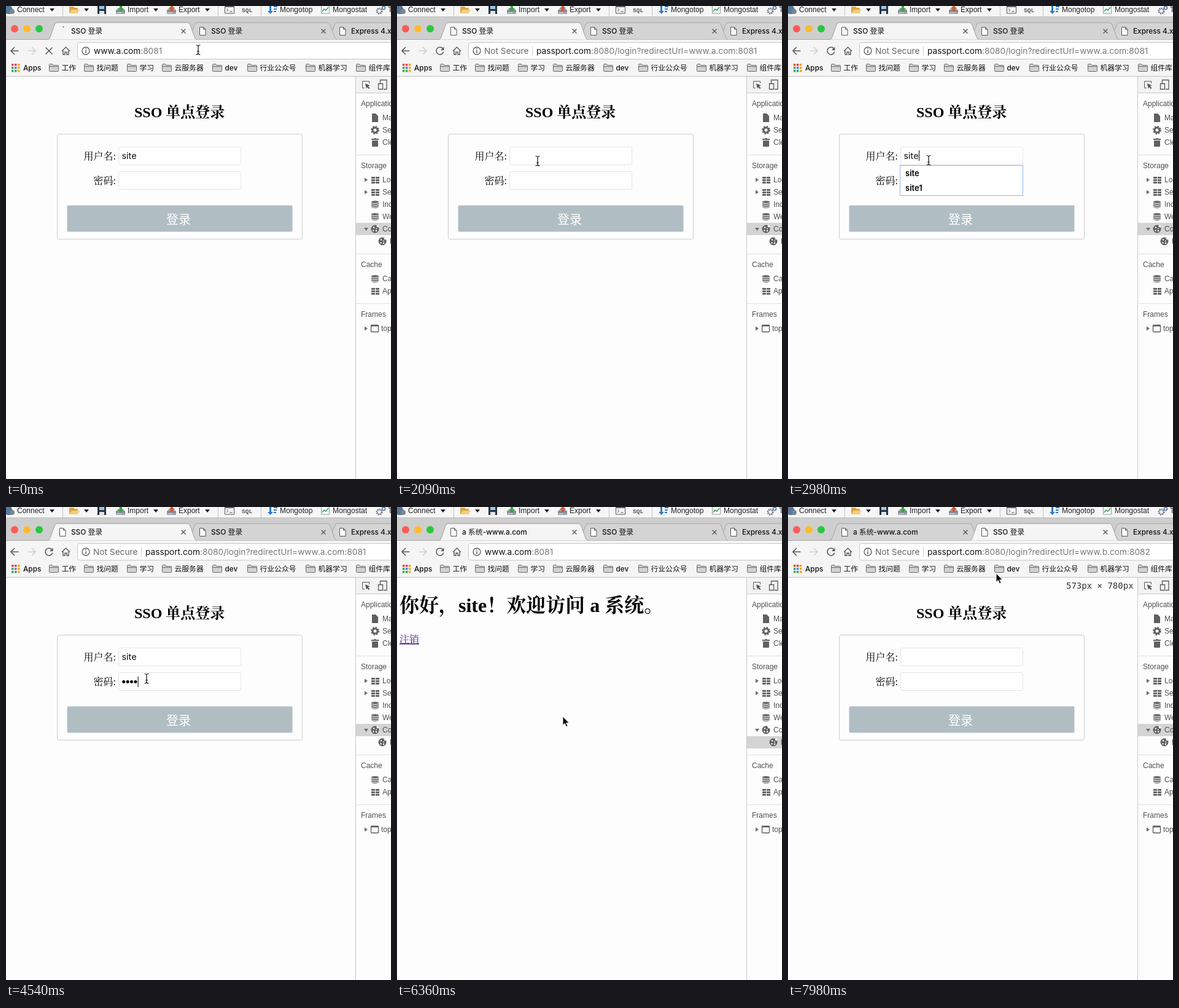
An HTML page for the animation above (8 s loop, 627x770 px).

```html
<!DOCTYPE html>
<html lang="zh-CN">
<head>
<meta charset="utf-8">
<title>SSO</title>
<style>
html, body { margin: 0; width: 100%; height: 100%; overflow: hidden; background: #fdfdfd }
svg { display: block; width: 627px; height: 770px }
text { font: 12px Inter, "Noto Sans CJK SC", sans-serif; fill: #111; white-space: pre }
.tool { font: 12px "Liberation Sans", Arial, sans-serif; fill: #222 }
.dev { font: 12px "Liberation Sans", Arial, sans-serif; fill: #505050 }
.mark { font-weight: 500; font-size: 11.8px }
.url { font-size: 13.7px }
.dim { fill: #777 }
.serif { font: 16px "Liberation Serif", "Noto Serif CJK SC", "Noto Sans CJK SC", serif; fill: #000 }
.field { font-size: 14.4px }
.item { font-size: 13px; font-weight: 600; fill: #000 }
.line { fill: none; stroke: #5a5a5a; stroke-width: 1.6 }
.thin { fill: none; stroke: #5a5a5a }
</style>
</head>
<body>
<svg viewBox="0 0 627 770">
<defs>
  <path id="tab" d="M0 54.5q3 -.5 4 -4l7 -19.5q1.500 -4 4 -4H228q2.500 0 4 4l7 19.500q1 3.500 4 4" stroke="#a6a6a6"/>
  <path id="sheet" d="M.5 .5h6l3.500 3.500v9.500h-9.500zM6.500 .5v3.500h3.500" fill="#fff" stroke="#555"/>
  <path id="cross" d="M-3.500 -3.500l7 7m0 -7l-7 7" stroke="#555" stroke-width="1.3"/>
  <path id="folder" d="M.5 11.500v-10q0 -1 1 -1h4l1.500 2h7.500q1 0 1 1v8q0 1 -1 1h-13q-1 0 -1 -1zM.5 4.500h15" fill="#d2d2d2" stroke="#6b6b6b"/>
  <path id="drop" d="M-4 -2h8l-4 5z" fill="#222"/>
  <path id="open" d="M0 -3.500l5 3.500l-5 3.500z" fill="#6e6e6e"/>
  <path id="grid" d="M0 0h6v3h-6zM7 0h6v3h-6zM0 4h6v3h-6zM7 4h6v3h-6zM0 8h6v3h-6zM7 8h6v3h-6z" fill="#666"/>
  <g id="base" fill="#6b6b6b"><path d="M0 2v8.500q6 3.500 12 0v-8.500z"/><ellipse cx="6" cy="2" rx="6" ry="2"/>
    <path d="M0 3.500q6 2.500 12 0M0 6.500q6 2.500 12 0M0 9.500q6 2.500 12 0" fill="none" stroke="#fdfdfd"/></g>
  <g id="cookie"><circle r="6.500" fill="#606060"/><g fill="#f4f4f4"><circle cx="4.500" cy="-4.500" r="2"/><circle cx="-2" cy="-2.500" r="1.300"/><circle cx="-2.500" cy="2.500" r="1.200"/><circle cx="2" cy="3" r="1.300"/><circle cx="2" cy="-.5" r="1"/></g></g>
  <g id="disk"><path d="M0 7l4 -4h7l4 4v5q0 1 -1 1h-13q-1 0 -1 -1z" fill="#9ba2aa"/><path d="M0 8h15" stroke="#5d6670"/><path d="M2 11h7" stroke="#d9dde0"/></g>
</defs>

<!-- application toolbar -->
<rect width="627" height="18" fill="#f6f6f6"/>
<path d="M92.500 0v17M345.500 0v17M415.500 0v17" stroke="#c4c4c4"/>
<g id="tools">
  <path d="M0 0h8l3 5v6q-5 4 -11 1z" fill="#56789a"/><circle cx="10" cy="9" r="4" fill="#7d858d"/>
  <path d="M103 1h7l2 2h5v9h-14z" fill="#d9a648"/><path d="M103 12l4 -6h13l-4 6z" fill="#f2cf7c"/>
  <path d="M149 0h14v13h-14z" fill="#28333e"/><path d="M152 0h8v5h-8z" fill="#9bc4e2"/><path d="M152 8h8v5h-8z" fill="#dde3e8"/>
  <use href="#disk" x="179"/><path d="M185 0h4v4h3l-5 5l-5 -5h3z" fill="#39a845"/>
  <use href="#disk" x="262"/><path d="M268 8h4v-4h3l-5 -5l-5 5h3z" fill="#d8582c"/>
  <path d="M356.500 -1h15v13h-15z" fill="#f7f7f7" stroke="#555"/><path d="M356 0h16v2h-16z" fill="#666"/><path d="M359 4l3 2.500l-3 2.500m5 0h5" class="thin"/>
  <path d="M429 0h3v8h3l-4.500 5l-4.500 -5h3zM436 0h6v2h-6zM436 4h5v2h-5zM436 8h4v2h-4z" fill="#2e7bc4"/>
  <path d="M513.500 -1h13v13h-13z" fill="#fff" stroke="#899"/><path d="M515 9l3 -4l3 2l4 -5" fill="none" stroke="#2f9a53" stroke-width="1.500"/>
  <circle cx="608" cy="8" r="4" fill="none" stroke="#70798a" stroke-width="3" stroke-dasharray="2 1"/><circle cx="615" cy="3" r="2.500" fill="none" stroke="#6f88ab" stroke-width="2"/>
</g>

<!-- browser frame -->
<rect y="17.500" width="627" height="37" fill="#cecece"/>
<path d="M0 17.500h627" stroke="#c0c0c0"/>
<rect y="54" width="627" height="61" fill="#f5f5f5"/>
<path d="M0 54.500h627" stroke="#a6a6a6"/>
<circle cx="14" cy="37" r="6" fill="#fc5b57"/><circle cx="34" cy="37" r="6" fill="#fdbc2e"/><circle cx="54" cy="37" r="6" fill="#28c83f"/>
<g fill="#d4d4d5"><use href="#tab" x="524"/><use href="#tab" x="296"/><use href="#tab" x="68"/></g>
<use id="active" href="#tab" fill="#f5f5f5"/>
<use id="sheet1" href="#sheet" x="87" y="34"/><use href="#sheet" x="315" y="34"/><use href="#sheet" x="543" y="34"/>
<circle id="spin" cx="92.500" cy="41" r="7" fill="none" stroke="#4b7fe8" stroke-width="2" transform="rotate(-90 92.5 41)"/>
<use href="#cross" x="289" y="41"/><use href="#cross" x="517" y="41"/>
<text id="title" class="mark" x="106" y="45"></text>
<text class="mark" x="334" y="45">SSO 登录</text><text class="mark" x="562" y="45">Express 4.x API</text>
<path class="line" d="M20.500 73h-12m5.500 -6l-6 6l6 6"/>
<path class="line" d="M35.500 73h12m-5.500 -6l6 6l-6 6" style="stroke:#cfcfcf"/>
<path id="stop" class="line" d="M64.500 67.500l11 11m0 -11l-11 11"/>
<g id="reload"><path class="line" d="M74.500 69a6 6 0 1 0 1.300 5.500"/><path d="M76.500 66.500v5.500h-5.500z" fill="#5a5a5a"/></g>
<path class="line" d="M91 73.500l6.500 -6.500l6.500 6.500M93 72.500v6.500h3v-4h3v4h3v-6.500" style="stroke-width:1.400"/>
<rect x="116.500" y="59.500" width="520" height="27" rx="3" fill="#fff" stroke="#c6c6c6"/>
<circle cx="130" cy="73" r="6" class="thin" stroke-width="1.300"/><path d="M130 72v4.500M130 69v1.600" stroke="#555" stroke-width="1.500"/>
<g id="chip"><text class="url" x="142" y="78" style="fill:#666">Not Secure</text><path d="M220.500 65v16" stroke="#d0d0d0"/></g>
<text id="url" class="url" y="78"></text>
<g id="marks"><text class="mark" x="28" y="105">Apps</text></g>
<path d="M0 114.500h627" stroke="#c2c2c2"/>

<!-- login page -->
<g id="login">
  <text class="serif" x="209" y="181" style="font-size:24px;font-weight:700">SSO 单点登录</text>
  <rect x="83.500" y="208.500" width="399" height="171" rx="3" fill="none" stroke="#cbcbcb"/>
  <text class="serif" x="179" y="250" text-anchor="end">用户名:</text><text class="serif" x="179" y="290" text-anchor="end">密码:</text>
  <g fill="#fefefe" stroke="#e6e6e6"><rect x="183.500" y="229.500" width="199" height="29" rx="2.500"/><rect x="183.500" y="269.500" width="199" height="29" rx="2.500"/></g>
  <text id="name" class="field" x="188.500" y="249"></text>
  <g id="dots"></g>
  <rect id="caret" width="1" height="17"/>
  <rect x="99.500" y="324.500" width="367" height="43" rx="2" fill="#b0bec4" stroke="#d9dfe2"/>
  <text x="281" y="355" text-anchor="middle" style="font-size:20px;fill:#fff">登录</text>
  <g id="list"><rect id="frame" x="182.500" y="259.500" width="200" fill="#fff" stroke="#8fb9e8"/><g id="items"></g></g>
</g>

<!-- welcome page -->
<g id="home">
  <text class="serif" x="4" y="171" style="font-size:32px;font-weight:700">你好，site！欢迎访问 a 系统。</text>
  <text class="serif" x="4" y="221" style="fill:#551a8b;text-decoration:underline">注销</text>
</g>
<text id="size" x="453" y="133" style="font:14px 'DejaVu Sans Mono',monospace;fill:#333">573px × 780px</text>

<!-- developer panel -->
<rect x="569" y="115" width="58" height="655" fill="#fdfdfd"/>
<rect x="569" y="115" width="58" height="26" fill="#f3f3f3"/>
<path d="M569.500 115v655M569 141.500h58" stroke="#c8c8c8"/>
<path d="M570 242.500h57M570 403.500h57M570 484.500h57" stroke="#e2e2e2"/>
<path d="M584 133.500h-3.500v-11h11v3.500" class="thin"/><path d="M585 126l8 3.500l-3.500 1l3 3l-1.500 1.500l-3 -3l-1 3z" fill="#555"/>
<path d="M609.500 126v-5.500h10.500v15h-5M606.500 126.500h7v9h-7z" class="thin" stroke-width="1.300"/>
<rect id="row" x="570" width="57" height="20" fill="#d4d4d4"/>
<g id="panel">
  <path d="M596 175h6l4 4v10h-10z" fill="#606060"/>
  <circle cx="601" cy="202" r="4" fill="none" stroke="#606060" stroke-width="3"/><circle cx="601" cy="202" r="6" fill="none" stroke="#606060" stroke-width="2" stroke-dasharray="2.350 2.350"/>
  <path d="M596 219h10v9q0 1 -1 1h-8q-1 0 -1 -1zM595 216h4l1 -1h2l1 1h4v2h-12z" fill="#606060"/>
  <use href="#grid" x="595" y="278"/><use href="#grid" x="595" y="298"/><use href="#grid" x="595" y="459"/>
  <use href="#base" x="595" y="317"/><use href="#base" x="595" y="337"/><use href="#base" x="595" y="438"/>
  <use href="#cookie" x="601" y="363"/><use href="#cookie" x="613" y="383"/>
  <use href="#open" x="584" y="283"/><use href="#open" x="584" y="303"/><use href="#open" x="584" y="525"/>
  <path d="M583 361h7l-3.500 5z" fill="#6e6e6e"/>
  <rect x="594.500" y="519.500" width="12" height="11" rx="1" class="thin" stroke-width="1.300"/><path d="M594 520.500h13" stroke="#5a5a5a" stroke-width="2"/>
</g>

<g id="beam" fill="none"><path d="M-3.500 -7.500q3 0 3.500 1.500q.5 -1.500 3.500 -1.500M0 -6v13M-3.500 8q3 0 3.500 -1.500q.5 1.500 3.500 1.500M-2 3h4" stroke="#fff" stroke-width="2.500" opacity=".7"/><path d="M-3.500 -7.500q3 0 3.500 1.500q.5 -1.500 3.500 -1.500M0 -6v13M-3.500 8q3 0 3.500 -1.500q.5 1.500 3.500 1.500M-2 3h4" stroke="#111" stroke-width="1.200"/></g>
<path id="arrow" d="M0 0v14.500l3.300 -3.200l2.300 5.400l2.400 -1l-2.300 -5.200h4.600z" fill="#000" stroke="#fff"/>
</svg>
<script>
const $ = id => document.getElementById(id);
const add = (id, html) => $(id).insertAdjacentHTML('beforeend', html);
const label = (id, cls, y, items) => items.forEach(([x, s, dy = 0]) => add(id, `<text class="${cls}" x="${x}" y="${y + dy}">${s}</text>`));
const show = (id, on) => $(id).style.display = on ? '' : 'none';
const set = (id, attrs) => { for (const k in attrs) $(id).setAttribute(k, attrs[k]); };
const put = (id, html) => { if ($(id).last !== html) $(id).innerHTML = $(id).last = html; };

label('tools', 'tool', 10, [[18, 'Connect'], [198, 'Import'], [281, 'Export'], [446, 'Mongotop'], [532, 'Mongostat'], [622, 'Tools']]);
add('tools', '<text x="384" y="10" style="font:700 9.500px \'Liberation Mono\',monospace;fill:#555">SQL</text>');
[75, 131, 244, 328].forEach(x => add('tools', `<use href="#drop" x="${x}" y="6"/>`));

const hues = ['#e8453c', '#e8453c', '#f5a623', '#3aa757', '#4285f4', '#f5a623', '#3aa757', '#3aa757', '#f5a623'];
hues.forEach((c, i) => add('marks', `<rect x="${9 + i % 3 * 5}" y="${94 + (i / 3 | 0) * 5}" width="3.500" height="3.500" fill="${c}"/>`));
[[70, '工作'], [127, '找问题'], [197, '学习'], [254, '云服务器'], [336, 'dev'], [393, '行业公众号'], [488, '机器学习'], [570, '组件库']]
  .forEach(([x, s]) => add('marks', `<use href="#folder" x="${x}" y="94"/><text class="mark" x="${x + 20.5}" y="105">${s}</text>`));

label('panel', 'dev', 0, [[578, 'Application', 163], [578, 'Storage', 264], [578, 'Cache', 425], [578, 'Frames', 506],
  [613, 'Manifest', 186], [613, 'Service Workers', 206], [613, 'Clear storage', 226],
  [613, 'Local Storage', 287], [613, 'Session Storage', 307], [613, 'IndexedDB', 327], [613, 'Web SQL', 347], [613, 'Cookies', 367],
  [625, 'http://www.a.com:8081', 387], [613, 'Cache Storage', 448], [613, 'Application Cache', 468], [611, 'top', 529]]);

const ticks = [0, 150, 300, 450, 630, 770, 910, 1060, 1210, 1500, 1650, 1800, 1940, 2090, 2240, 2530, 2680, 2830, 2980,
  3310, 3460, 3610, 3760, 3910, 4210, 4360, 4520, 4680, 4980, 5130, 5280, 5580, 5730, 5880, 6030, 6360, 6940, 7090, 7540, 7690, 7840, 7980];
const path = [[0, 313, 71], [450, 320, 73], [630, 330, 74], [1060, 364, 68], [1210, 370, 63], [1500, 350, 92], [2090, 229, 252],
  [2980, 229, 251], [3310, 229, 255], [3760, 229, 279], [4680, 229, 279], [4980, 240, 296], [5280, 270, 341], [6360, 270, 341],
  [6940, 277, 333], [7090, 284, 323], [7540, 318, 150], [7690, 350, 42], [7840, 350, 42], [7980, 339, 108], [8000, 339, 108]];

function pointer(t) {
  const i = path.findIndex(p => p[0] > t);
  const [t0, x0, y0] = path[i - 1], [t1, x1, y1] = path[i], k = (t - t0) / (t1 - t0);
  return [x0 + (x1 - x0) * k, y0 + (y1 - y0) * k];
}

const link = (host, rest) => `${host}<tspan class="dim">${rest}</tspan>`;
const within = (t, a, b) => t >= a && t < b;

function draw(now) {
  const clock = now % 8000, t = ticks.findLast(v => v <= clock);
  const second = t >= 7840, home = within(t, 6360, 7840);
  const loading = t < 450 || within(t, 5580, 6360);
  const direct = t < 450 || within(t, 5730, 7840);

  set('active', { x: second ? 296 : 68 });
  put('title', t < 5730 ? 'SSO 登录' : t < 6360 ? 'www.a.com:8081' : 'a 系统-www.a.com');
  show('sheet1', !loading);
  show('spin', loading);
  show('stop', loading);
  show('reload', !loading);
  set('spin', { 'stroke-dasharray': `${2 + (t < 450 ? t : t - 5580) * .055} 50` });

  show('chip', !direct);
  set('url', { x: direct ? 143 : 227 });
  put('url', direct ? link('www.a.com', ':8081')
    : link('passport.com', ':8080/login?redirectUrl=www.' + (second ? 'b.com:8082' : 'a.com:8081')));

  show('login', !home);
  show('home', home);
  show('size', second);
  set('row', { y: within(t, 6030, 7840) ? 373 : 353 });

  const typed = Math.max(0, ticks.indexOf(t) - ticks.indexOf(2530) + 1);
  put('name', t < 450 ? 'site' : second ? '' : 'site'.slice(0, typed));
  const dots = second ? 0 : [4210, 4210, 4360, 4520, 4680, 4680].filter(v => v <= t).length;
  put('dots', Array.from({ length: dots }, (_, i) => `<circle cx="${191.7 + i * 6.4}" cy="284.500" r="2.500"/>`).join(''));

  const inName = within(t, 2240, 3760);
  show('caret', inName || within(t, 3760, 5280));
  set('caret', inName ? { x: 189 + $('name').getComputedTextLength(), y: 235 } : { x: 189 + dots * 6.4, y: 276 });

  show('list', within(t, 2240, 3610));
  const options = t < 2530 ? ['site', 'site1', 'admin', 'guest', 'demo', 'user'] : ['site', 'site1'];
  set('frame', { height: options.length * 24 + 1 });
  put('items', options.map((s, i) => `<text class="item" x="191" y="${277 + i * 24}">${s}</text>`).join(''));

  const beam = t <= 1210 || within(t, 2090, 4980), transform = `translate(${pointer(t)})`;
  show('beam', beam);
  show('arrow', !beam);
  set('beam', { transform });
  set('arrow', { transform });
  requestAnimationFrame(draw);
}
draw(0);
</script>
</body>
</html>
```
